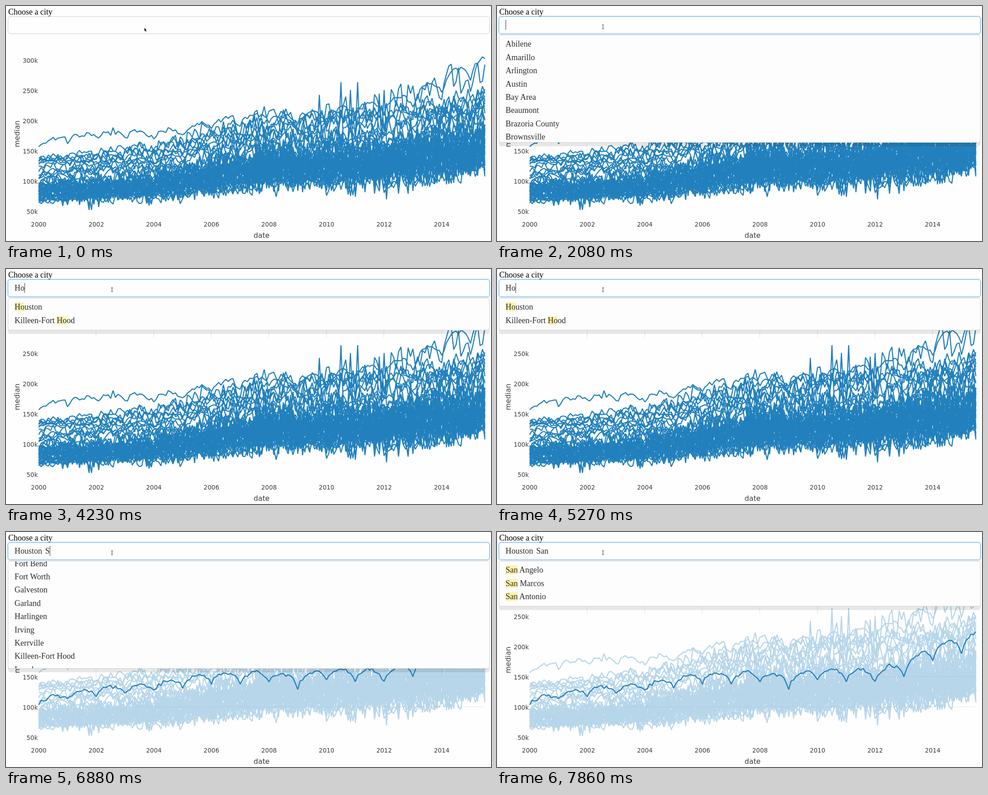
An HTML page that plays this animation: 1075x521 px, repeating every 8000 ms.

```html
<!DOCTYPE html>
<html lang="en">
<head>
<meta charset="utf-8">
<title>City chart</title>
<style>
  html, body { margin: 0; width: 100%; height: 100%; overflow: hidden; background: #fefefe; }
  body { position: relative; font: 18px "Liberation Serif", serif; color: #2c2c2c; }
  body > * { position: absolute; box-sizing: border-box; }
  svg { left: 0; top: 0; }
  #chart text { font: 13.5px "DejaVu Sans", sans-serif; fill: #3c3c3c; }
  #chart text.title { font-size: 15.75px; }
  #label { left: 5px; top: 3px; line-height: 20px; color: #000; }
  #input { left: 4px; top: 23px; width: 1068px; height: 39px; padding-left: 14px;
    border: 1px solid #ccc; border-radius: 5px; line-height: 37px; white-space: nowrap; background: #fefefe; }
  #input.focus { border-color: #66afe9; box-shadow: 0 0 4px rgba(102, 175, 233, .6); }
  #input .tag { margin-right: 7px; }
  #caret { top: 31px; width: 1px; height: 22px; background: #333; }
  #menu { left: 4px; top: 64px; width: 1068px; max-height: 239px; overflow: hidden; padding: 5.4px 0 5.4px 14px;
    border: 1px solid #d0d0d0; border-radius: 5px; background: #fdfdfd; box-shadow: 0 8px 1px rgba(0, 0, 0, .09); }
  #menu div { height: 29.4px; line-height: 29.4px; }
  mark { background: #fff4ad; color: inherit; }
  #thumb { left: 1066px; top: 142px; width: 4px; height: 40px; border-radius: 2px; background: #858585; }
</style>
</head>
<body>
<svg id="chart" width="1075" height="521">
  <path id="grid" stroke="#e2e2e2" stroke-width="1"/>
  <g fill="none" stroke="#2281bd" stroke-width="2.4" stroke-linejoin="bevel">
    <path id="cities"/>
    <path id="gridOver" stroke="#6fa5c9" stroke-opacity=".22" stroke-width="1" d="M280 387.5H1060M560 320.5H1060"/>
    <path id="chosen"/>
  </g>
  <g id="axes"></g>
</svg>
<div id="label">Choose a city</div>
<div id="input"></div>
<div id="caret"></div>
<div id="menu"></div>
<div id="thumb"></div>
<svg id="pointer" width="1075" height="80">
  <path id="arrow" d="M0 0V8.4L2 6.7L3.5 10L4.9 9.4L3.5 6.2H6Z" fill="#111" stroke="#fff" stroke-width=".6"/>
  <path id="beam" d="M233 41.5h1.3l.7 .7l.7 -.7H237M235 42V50M233 50.5h1.3l.7 -.7l.7 .7H237" fill="none" stroke="#333"/>
</svg>
<script>
const $ = id => document.getElementById(id);
const MONTHS = 187, YEAR_WIDTH = 63.8;
const yearX = year => 72.5 + year * YEAR_WIDTH;
const priceY = price => 456 - (price - 50) * 1.342;

let seed = 7;
function random() {
  seed = seed + 0x6D2B79F5 | 0;
  let n = Math.imul(seed ^ seed >>> 15, 1 | seed);
  n = n + Math.imul(n ^ n >>> 7, 61 | n) ^ n;
  return ((n ^ n >>> 14) >>> 0) / 4294967296;
}
const jitter = () => random() + random() - 1;

// Linear interpolation through [year, value] points.
function along(points, year) {
  const next = points.findIndex(([start]) => start > year);
  const [x0, y0] = points[next - 1], [x1, y1] = points[next];
  return y0 + (y1 - y0) * (year - x0) / (x1 - x0);
}

// Monthly prices: a yearly trend, lower each January, with noise.
function priceLine(trend, season, noise) {
  const points = [];
  for (let m = 0; m < MONTHS; m++) {
    const year = m / 12, base = trend(year);
    const summer = Math.abs(Math.sin(Math.PI * year)) ** .7;
    const jolt = random() < .025 ? 1.8 : 1;
    const price = base + summer * season(year, base) + jitter() * jolt * noise(year, base);
    points.push(yearX(year).toFixed(1) + " " + priceY(Math.max(price, 53)).toFixed(1));
  }
  return "M" + points.join("L");
}

const GROWTH = [[0, 1], [4, 1.1], [8, 1.44], [12, 1.49], [16, 1.85]];
const DEAREST = [[0, 157], [1, 167], [5, 172], [6, 186], [8, 198], [9, 192], [12, 212], [13, 224], [16, 292]];
const HOUSTON = [[0, 104], [2, 121], [4, 126], [6, 140], [8, 142], [9, 133], [10, 144], [12, 140], [13, 152], [14, 177], [16, 206]];
const PEAKS = [[9.75, 243], [10.5, 264], [10.83, 251], [11.08, 264], [11.83, 245], [12, 251]];
const GROUPS = [
  { count: 33, low: 69, high: 93, noise: .14 },
  { count: 7, low: 95, high: 118, noise: .1 },
  { count: 6, low: 126, high: 139, noise: .055 }
];

function ordinaryCity({ low, high, noise }, share) {
  const start = low + (high - low) * share;
  const fortune = .2 * (random() - .5), phase = random() * 6.28;
  const restless = noise * (.7 + .6 * random());
  return priceLine(
    year => start * along(GROWTH, year) * (1 + fortune * year / 15.5 + .025 * Math.sin(year * .9 + phase)),
    (year, base) => base * (.02 + .003 * year),
    (year, base) => base * restless * (1 + Math.min(1, year / 8))
  );
}

const tracked = (points, noise) => priceLine(year => along(points, year), year => 9 + 1.1 * year, () => noise);
const peak = ([year, top]) =>
  `M${yearX(year - 1 / 12)} ${priceY(170)}L${yearX(year)} ${priceY(top)}L${yearX(year + 1 / 12)} ${priceY(165)}`;

const cityPaths = [tracked(DEAREST, 6), ...PEAKS.map(peak)];
for (const group of GROUPS)
  for (let i = 0; i < group.count; i++) cityPaths.push(ordinaryCity(group, i / (group.count - 1)));
$("cities").setAttribute("d", cityPaths.join(""));
$("chosen").setAttribute("d", tracked(HOUSTON, 4));

const label = (x, y, text, extra) => `<text x="${x}" y="${y}" ${extra}>${text}</text>`;
let axes = label(566.5, 514, "date", 'class="title" text-anchor="middle"') +
  label(-283.5, 30, "median", 'class="title" text-anchor="middle" transform="rotate(-90)"');
for (let price = 50; price <= 300; price += 50) axes += label(70.5, priceY(price) + 5, price + "k", 'text-anchor="end"');
for (let year = 0; year < 16; year += 2) axes += label(yearX(year), 489, 2000 + year, 'text-anchor="middle"');
$("axes").innerHTML = axes;

const ALL = ["Abilene", "Amarillo", "Arlington", "Austin", "Bay Area", "Beaumont", "Brazoria County", "Brownsville"];
const WITH_H = ["Houston", "Harlingen", "Fort Worth", "Nacogdoches", "Port Arthur", "Wichita Falls", "Corpus Christi", "Sherman-Denison"];
const AFTER_PICK = ["Fort Bend", "Fort Worth", "Galveston", "Garland", "Harlingen", "Irving", "Kerrville", "Killeen-Fort Hood", "Laredo"];
const SANS = ["San Angelo", "San Marcos", "San Antonio"];

// Each step changes part of the state from its time on.
const STEPS = [
  [0, { arrow: [306.5, 48], list: null, query: "", typed: "", picked: "", caret: false, scroll: 0, thumb: 0 }],
  [750, { arrow: [294.5, 48] }],
  [990, { arrow: [234, 47] }],
  [2080, { arrow: null, list: ALL, caret: true }],
  [2680, { caret: false }],
  [3190, { caret: true }],
  [3330, { typed: "H" }],
  [3720, { list: WITH_H, query: "h" }],
  [4020, { typed: "Ho" }],
  [4230, { list: ["Houston", "Killeen-Fort Hood"], query: "ho" }],
  [4650, { caret: false }],
  [5270, { caret: true }],
  [6020, { picked: "Houston", typed: "", query: "", list: AFTER_PICK, scroll: 14.7, thumb: 1 }],
  [6320, { caret: false, thumb: .5 }],
  [6680, { thumb: 0 }],
  [6880, { typed: "S", caret: true }],
  [7210, { typed: "San", list: [...SANS, "Odessa"], query: "sa", scroll: 0 }],
  [7660, { list: SANS, query: "san" }],
  [7860, { caret: false }]
];
const LOOP = 8000;

const highlight = (name, query) => query ? name.replace(new RegExp(query, "i"), "<mark>$&</mark>") : name;

function render(state) {
  const open = !!state.list;
  $("input").className = open ? "focus" : "";
  $("input").innerHTML = (state.picked && `<span class="tag">${state.picked}</span>`) +
    `<span id="typed">${state.typed}</span>`;
  $("caret").hidden = !state.caret;
  $("caret").style.left = Math.round($("typed").getBoundingClientRect().right) + "px";

  $("menu").hidden = !open;
  $("menu").innerHTML = (state.list || []).map((name, i) =>
    `<div${i ? "" : ` style="margin-top:${-state.scroll}px"`}>${highlight(name, state.query)}</div>`).join("");
  $("thumb").style.opacity = state.thumb;

  let grid = "";
  if (open) {
    const bottom = $("menu").getBoundingClientRect().bottom;
    for (let year = 2; year < 16; year += 2) grid += `M${Math.round(yearX(year)) - .5} ${bottom}v17`;
  }
  $("grid").setAttribute("d", grid);

  $("cities").setAttribute("opacity", state.picked ? .325 : 1);
  $("gridOver").setAttribute("visibility", state.picked ? "visible" : "hidden");
  $("arrow").setAttribute("visibility", state.arrow ? "visible" : "hidden");
  $("beam").setAttribute("visibility", state.arrow ? "hidden" : "visible");
  if (state.arrow) $("arrow").setAttribute("transform", `translate(${state.arrow})`);
}

let shown = 0;
function tick() {
  const time = performance.now() % LOOP;
  const passed = STEPS.filter(([start]) => start <= time);
  if (passed.length !== shown) {
    shown = passed.length;
    render(Object.assign({}, ...passed.map(([, change]) => change)));
  }
  requestAnimationFrame(tick);
}
tick();
</script>
</body>
</html>
```
